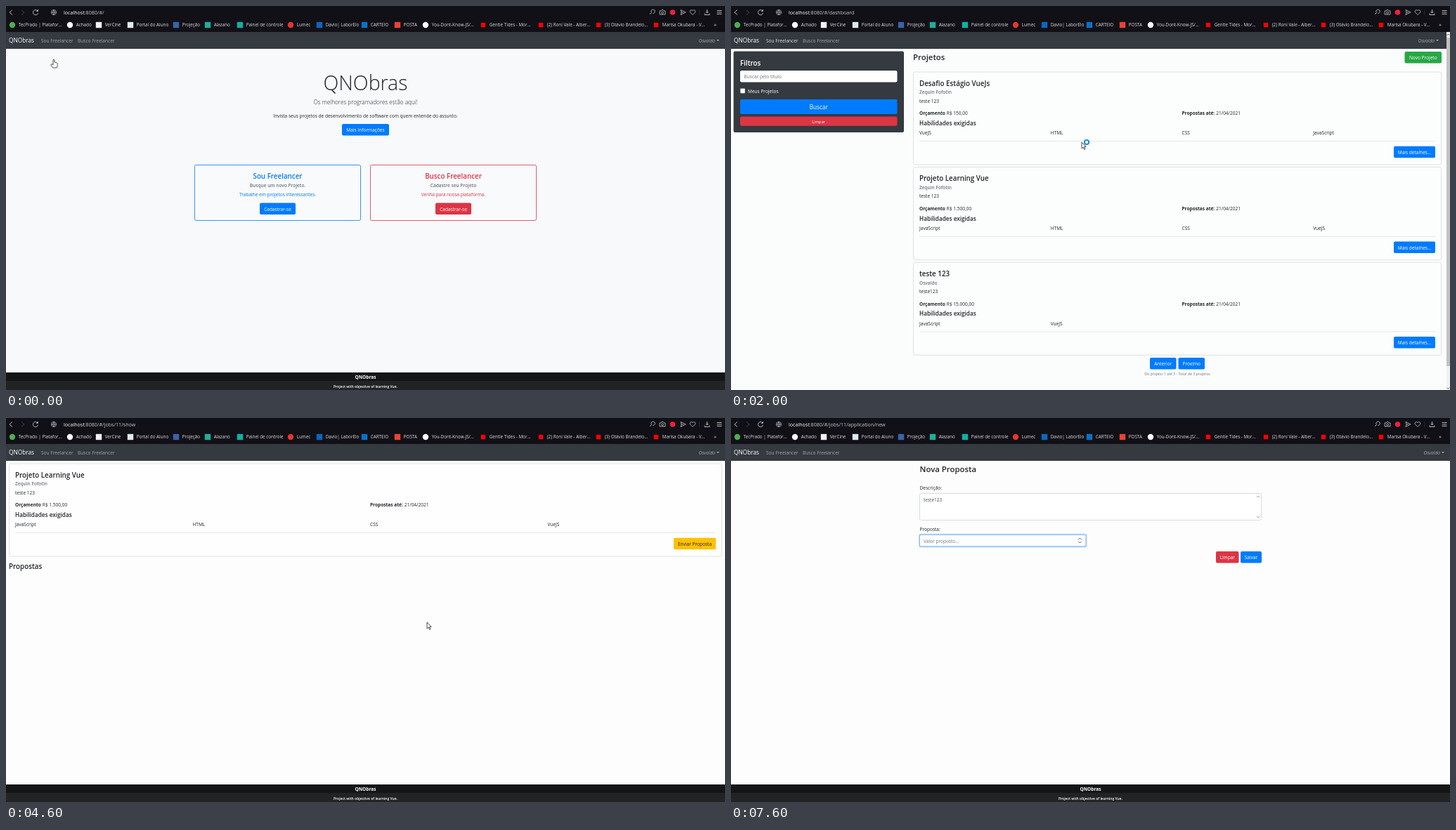
Write an HTML page with a canvas that moves like this. It is 1023 by 547 pixels and loops after 8000 ms.

```html
<!DOCTYPE html>
<html lang="pt-BR">
<head>
<meta charset="utf-8">
<title>QNObras</title>
<style>
html, body { margin: 0; width: 100%; height: 100%; overflow: hidden; background: #fdfdfd; }
canvas { display: block; }
</style>
</head>
<body>
<canvas id="stage" width="1023" height="547"></canvas>
<script>
const ctx = document.getElementById('stage').getContext('2d', { alpha: false });
const BRAND = 'QNObras', USER = 'Osvaldo', LOOP = 8000;
const BODY = 6.55, H3 = 11.4, H4 = 9.8, H5 = 8.2, BUTTON = 16.5;
const BLUE = '#007bff', RED = '#dc3545', GREEN = '#28a745', YELLOW = '#ffc107';
const DARK = '#343a40', INK = '#212529', MUTED = '#6c757d', WHITE = '#fff';

const bookmarks = [
  [9, '#4caf50', 'circle', 'TecPrado | Platafor...'], [91, WHITE, 'circle', 'Achado'],
  [132, '#f4f4f4', 'square', 'VerCine'], [177, '#dcecf4', 'square', 'Portal do Aluno'],
  [242, '#3c62a8', 'square', 'Projeção'], [287, '#1fae9a', 'square', 'Alazano'],
  [333, '#12b0a4', 'square', 'Painel de controle'], [405, '#e8352e', 'circle', 'Lumec'],
  [446, '#0a66c2', 'square', 'Davio| LaborElo'], [510, '#0a72c8', 'square', 'CARTEIO'],
  [557, '#ea4335', 'square', 'POSTA'], [597, WHITE, 'circle', 'You-Dont-Know-JS/...'],
  [679, '#f00', 'square', 'Gentle Tides - Mor...'], [761, '#f00', 'square', '(2) Roni Vale - Alber...'],
  [843, '#f00', 'square', '(3) Otávio Brandelo...'], [925, '#f00', 'square', 'Marisa Okubara - V...']
];

const jobs = [
  { title: 'Desafio Estágio VueJs', owner: 'Zequin Fofotin', text: 'teste 123', price: '150,00', skills: ['VueJS', 'HTML', 'CSS', 'JavaScript'] },
  { title: 'Projeto Learning Vue', owner: 'Zequin Fofotin', text: 'teste 123', price: '1.500,00', skills: ['JavaScript', 'HTML', 'CSS', 'VueJS'] },
  { title: 'teste 123', owner: USER, text: 'teste123', price: '15.000,00', skills: ['JavaScript', 'VueJS'] }
];

// Timelines: [start, value...]; each entry holds until the next one.
const pages = [[0, 'home'], [1000, 'empty'], [2000, 'list'], [3900, 'loading'], [4200, 'show'], [5700, 'form']];
const typed = [[0, 0], [6300, 1], [6400, 2], [6500, 4], [6700, 5], [6800, 6], [6900, 8]];
const pointer = [
  [0, 68, 76, 'hand'], [100, 71, 74, 'hand'], [200, 78, 66, 'hand'], [300, 85, 57, 'hand'], [400, 89, 53, 'hand'],
  [700, 91, 51, 'hand'], [1300, 160, 95, 'arrow'], [1400, 234, 135, 'arrow'], [1600, 380, 170, 'busy'],
  [1700, 499, 194, 'busy'], [2200, 536, 240, 'arrow'], [2400, 548, 265, 'arrow'], [2600, 700, 300, 'arrow'],
  [2700, 830, 316, 'arrow'], [2800, 897, 319, 'arrow'], [3000, 930, 345, 'arrow'], [3100, 961, 355, 'arrow'],
  [3200, 965, 345, 'arrow'], [3600, 966, 345, 'hand'], [3900, 760, 315, 'arrow'], [4000, 599, 291, 'arrow'],
  [4700, 720, 250, 'arrow'], [4800, 0, 0, 'none'], [5000, 1014, 164, 'arrow'], [5100, 996, 170, 'arrow'],
  [5200, 977, 176, 'arrow'], [5400, 979, 176, 'hand'], [5700, 0, 0, 'none']
];
const urls = { home: '', empty: 'dashboard', list: 'dashboard', loading: 'jobs/11/show', show: 'jobs/11/show', form: 'jobs/11/application/new' };

const at = (track, t) => track.findLast(entry => entry[0] <= t);
const clamp = v => Math.max(0, Math.min(1, v));

// Draws text with its capitals centred on y and returns its width.
function text(str, x, y, { size = BODY, color = INK, weight = 400, align = 'left', style = '' } = {}) {
  ctx.font = `${style} ${weight} ${size}px "Open Sans", "Noto Sans", sans-serif`;
  ctx.textAlign = align;
  ctx.fillStyle = color;
  ctx.fillText(str, x, y + size * 0.36);
  return ctx.measureText(str).width;
}

function rect(x, y, w, h, color) {
  ctx.fillStyle = color;
  ctx.fillRect(x, y, w, h);
}

function box(x, y, w, h, fill, stroke, width = 0.8, radius = 2) {
  ctx.beginPath();
  ctx.roundRect(x, y, w, h, radius);
  if (fill) { ctx.fillStyle = fill; ctx.fill(); }
  if (stroke) { ctx.strokeStyle = stroke; ctx.lineWidth = width; ctx.stroke(); }
}

function dot(x, y, r, color) {
  ctx.beginPath();
  ctx.arc(x, y, r, 0, 7);
  ctx.fillStyle = color;
  ctx.fill();
}

function path(d, x, y, stroke, fill, width = 0.9) {
  const shape = new Path2D(d);
  ctx.save();
  ctx.translate(x, y);
  if (fill) { ctx.fillStyle = fill; ctx.fill(shape); }
  if (stroke) { ctx.strokeStyle = stroke; ctx.lineWidth = width; ctx.stroke(shape); }
  ctx.restore();
}

function button(x, y, w, h, color, label, size = BODY, ink = WHITE) {
  box(x, y, w, h, color);
  text(label, x + w / 2, y + h / 2 + 0.6, { size, color: ink, align: 'center' });
}

function browser(url) {
  rect(0, 0, 1023, 37, '#111016');
  const icon = '#c8c8cc';
  path('M2-3.5L-2 0L2 3.5', 7, 9, icon);
  path('M-2-3.5L2 0L-2 3.5', 24, 9, '#48474d');
  path('M3-2A3.6 3.6 0 1 0 3.6 1M3.4-4V-1.6H1', 42, 9, icon);
  path('M-3.6 0A3.6 3.6 0 1 0 3.6 0A3.6 3.6 0 1 0-3.6 0H3.6M0-3.6Q-3 0 0 3.6Q3 0 0-3.6', 68, 9, icon, null, 0.7);
  const hostWidth = text('localhost', 82, 9, { size: 7.1, color: WHITE });
  text(':8080/#/' + url, 82 + hostWidth, 9, { size: 7.1, color: '#c9c9cc' });

  path('M-1.5 1A2.7 2.7 0 1 1 .5 2M-1.5 1L-4 3.5', 920, 8.5, icon);
  path('M-4-2H-2L-1-3.5H1L2-2H4V3H-4ZM-1.5.5A1.5 1.5 0 1 0 1.5.5A1.5 1.5 0 1 0-1.5.5', 934, 9, icon, null, 0.8);
  dot(948.5, 9, 3.8, '#f0203f');
  path('M-3-3.5L4 0L-3 3.5L-2 0ZM-2 0H1', 963, 9, icon, null, 0.8);
  path('M0 3.5L-3.5 0A2 2 0 0 1 0-2.4A2 2 0 0 1 3.5 0Z', 977, 9, icon, null, 0.8);
  rect(986, 5, 0.6, 8, '#37363c');
  path('M0-4V1M-2-1L0 1L2-1M-3.5 1.5V3.5H3.5V1.5', 997.5, 9, icon);
  path('M-3.5-2.5H3.5M-3.5 0H3.5M-3.5 2.5H3.5', 1015, 9, icon);

  for (const [x, color, shape, label] of bookmarks) {
    const r = color === '#f00' ? 3.2 : 4.2;
    if (shape === 'circle') dot(x, 27, r, color);
    else rect(x - r, 27 - r, 2 * r, 2 * r, color);
    text(label, x + 8.7, 27, { size: 6.3, color: '#dedee2' });
  }
  text('»', 1009, 26.5, { size: 8, color: icon, align: 'center' });
}

function navbar(right, hover) {
  rect(0, 37, 1023, 24, DARK);
  text(BRAND, 4, 49, { size: 8.3, color: WHITE });
  const dim = 'rgba(255,255,255,.55)';
  text('Sou Freelancer', 50, 49.5, { size: 6.6, color: hover ? 'rgba(255,255,255,.85)' : dim });
  text('Busco Freelancer', 102, 49.5, { size: 6.6, color: dim });
  text(USER, right - 14, 49.5, { size: 6.6, color: dim, align: 'right', style: 'italic' });
  path('M-2-1H2L0 1.2Z', right - 10, 49, null, dim);
}

function footer() {
  rect(0, 522, 1023, 12, '#141517');
  rect(0, 534, 1023, 13, '#222324');
  text(BRAND, 511.5, 528.5, { color: WHITE, weight: 700, align: 'center' });
  text('Project with objective of learning Vue.', 511.5, 542, { size: 5, color: WHITE, weight: 600, align: 'center' });
}

function offer(x, color, title, subtitle, note) {
  const mid = x + 118, align = 'center';
  box(x, 226.5, 236, 79, WHITE + '3', color);
  text(title, mid, 242.5, { size: H4, color, weight: 600, align });
  text(subtitle, mid, 256, { color: MUTED, weight: 600, align });
  text(note, mid, 269, { color, align });
  button(mid - 25.5, 280.5, 51, BUTTON, color, 'Cadastrar-se');
}

function home() {
  const align = 'center', mid = 511.5;
  text(BRAND, mid, 110, { size: 28.5, weight: 300, align });
  text('Os melhores programadores estão aqui!', mid, 137.5, { size: 8.2, weight: 300, align });
  text('Invista seus projetos de desenvolvimento de software com quem entende do assunto.', mid, 156.5, { align });
  button(478, 168, 67, BUTTON, BLUE, 'Mais Informações');
  offer(268.5, BLUE, 'Sou Freelancer', 'Busque um novo Projeto.', 'Trabalhe em projetos interessantes.');
  offer(518.5, RED, 'Busco Freelancer', 'Cadastre seu Projeto', 'Venha para nossa plataforma.');
}

function jobCard(x, y, w, job, label, buttonWidth, color, ink) {
  const left = x + 9, column = (w - 5) / 4;
  box(x + 0.5, y, w - 1, 132, WHITE + '3', '#d9dbdc');
  text(job.title, left, y + 16, { size: H4, weight: 600 });
  text(job.owner, left, y + 29, { color: MUTED, weight: 600 });
  text(job.text, left, y + 41.5);
  const pair = (key, value, px) => text(value, px + text(key, px, y + 59, { weight: 700 }) + 2, y + 59);
  pair('Orçamento', 'R$ ' + job.price, left);
  pair('Propostas até:', '21/04/2021', left + 2 * column);
  text('Habilidades exigidas', left, y + 73, { size: H5, weight: 600 });
  job.skills.forEach((skill, i) => text(skill, left + i * column, y + 87));
  rect(left, y + 98.3, w - 18, 0.7, '#dcdee0');
  button(x + w - 9 - buttonWidth, y + 105.8, buttonWidth, BUTTON, color, label, BODY, ink);
}

function filters(width) {
  const inner = width - 18.5;
  box(3.6, 64.5, width + 0.4, 115.5, DARK);
  text('Filtros', 13, 81, { size: H4, color: WHITE, weight: 600 });
  box(13, 92, inner, 16.5, WHITE);
  text('Buscar pelo título', 18.5, 100.5, { color: MUTED });
  box(13.2, 117.5, 6.8, 6.8, WHITE, '#777', 0.5, 1);
  text('Meus Projetos', 24, 121.5, { color: WHITE });
  button(13, 133, inner, 21, BLUE, 'Buscar', H5);
  button(13, 157.5, inner, 13.3, RED, 'Limpar', 5.75);
}

function dashboard(loaded, t) {
  const right = loaded ? 1011 : 1019, left = loaded ? 259 : 261;
  filters(loaded ? 242 : 244);
  text('Projetos', left, 72.5, { size: H3, weight: 600 });
  button(right - 52.5, 65, 52.5, BUTTON, GREEN, 'Novo Projeto');
  if (!loaded) {
    text('Nenhum projeto encontrado...', 261, 99.5, { color: MUTED });
    return;
  }
  jobs.forEach((job, i) => {
    const hover = i === 1 && t >= 3400;
    jobCard(259, 94 + i * 135.6, 752, job, 'Mais detalhes...', 59, hover ? '#0064d0' : BLUE);
  });
  button(596, 501, 37.5, BUTTON, BLUE, 'Anterior');
  button(636.5, 501, 37.5, BUTTON, BLUE, 'Próximo');
  text('Do projeto 1 até 3 - Total de 3 projetos', 635, 524, { size: 5.25, color: MUTED, align: 'center' });
  rect(1018, 37, 5, 510, '#f1f1f1');
  rect(1018, 45, 5, 468, '#c1c1c1');
  path('M-2 1L0-1L2 1', 1020.5, 41, '#505050');
  path('M-2-1L0 1L2-1', 1020.5, 544.5, '#505050');
}

function show(t) {
  const hover = t >= 5400;
  jobCard(4, 65, 1015, jobs[1], 'Enviar Proposta', 60, hover ? '#e0a800' : YELLOW, INK);
  text('Propostas', 4, 211, { size: H4, weight: 600 });
}

function field(y, w, h, value, placeholder, focus) {
  if (focus) box(268.2, y - 0.5, w + 0.6, h + 1, null, `rgba(0,123,255,${0.3 * focus})`, 2.4);
  box(268.5, y, w, h, WHITE, '#ced4da');
  if (focus) box(268.5, y, w, h, null, `rgba(128,189,255,${focus})`);
  text(value || placeholder, 274, y + 9, { color: value ? '#495057' : MUTED });
}

function form(t) {
  const value = 'teste123'.slice(0, at(typed, t)[1]);
  const arrived = clamp((t - 6300) / 150), moved = clamp((t - 7200) / 150);
  text('Nova Proposta', 268.5, 72.5, { size: H3, weight: 600 });
  text('Descrição:', 268.5, 99.5);
  field(107.5, 486, 38, value, 'Descreva sua proposta...', arrived * (1 - moved));
  path('M-2 1L0-1L2 1M-2 28L0 30L2 28', 750, 112, '#777', null, 0.7);
  text('Proposta:', 268.5, 158.5);
  field(166.5, 236.5, 16.3, '', 'Valor proposto...', moved);
  if (moved) path('M-2-1.5L0-3.5L2-1.5M-2 1.5L0 3.5L2 1.5', 496.5, 174.5, '#444');
  button(690, 190, 32.5, BUTTON, RED, 'Limpar');
  button(725, 190, 30, BUTTON, BLUE, 'Salvar');

  if (t >= 6100 && t < 7200) {
    ctx.font = `400 ${BODY}px "Open Sans", "Noto Sans", sans-serif`;
    rect(274 + ctx.measureText(value).width, 111, 0.8, 10, '#222');
  } else if (t >= 7200 && t < 7600) {
    rect(274, 170, 0.8, 10, '#222');
  }
}

function drawPointer([, x, y, shape]) {
  if (shape === 'none') return;
  if (shape === 'hand') {
    path('M-1 6V.8Q0-.8 1 .8V4.2Q2 3.5 2.6 4.7Q3.6 4 4.1 5.2Q5.2 5 5.2 6.5V8.5Q5 10 4 12H-1.2L-4 8.2Q-4 6-2.5 6.8L-1 8Z', x, y, '#222', WHITE, 0.8);
  } else {
    path('M0 0V9L2.1 7.1L3.5 10.4L5 9.8L3.6 6.5H6.2Z', x, y, '#222', WHITE, 0.8);
  }
  if (shape === 'busy') path('M-3.1 0A3.1 3.1 0 1 0 3.1 0A3.1 3.1 0 1 0-3.1 0', x + 7, y, '#1686dd', WHITE, 1.9);
}

function draw() {
  const t = performance.now() % LOOP;
  const page = at(pages, t)[1], isList = page === 'list';
  rect(0, 0, 1023, 547, { home: '#f7f9fb', list: '#fbfcfc' }[page] || '#fdfdfd');
  navbar(isList ? 1015 : 1023, t >= 300 && t < 3800);
  if (page === 'home') home();
  if (page === 'empty' || isList) dashboard(isList, t);
  if (page === 'show') show(t);
  if (page === 'form') form(t);
  if (!isList) footer();
  if (t >= 400 && t < 1300) rect(0, 535.5, 58.5, 11.5, '#4b4c4d');
  browser(urls[page]);
  drawPointer(at(pointer, t));
  requestAnimationFrame(draw);
}
draw();
</script>
</body>
</html>
```
